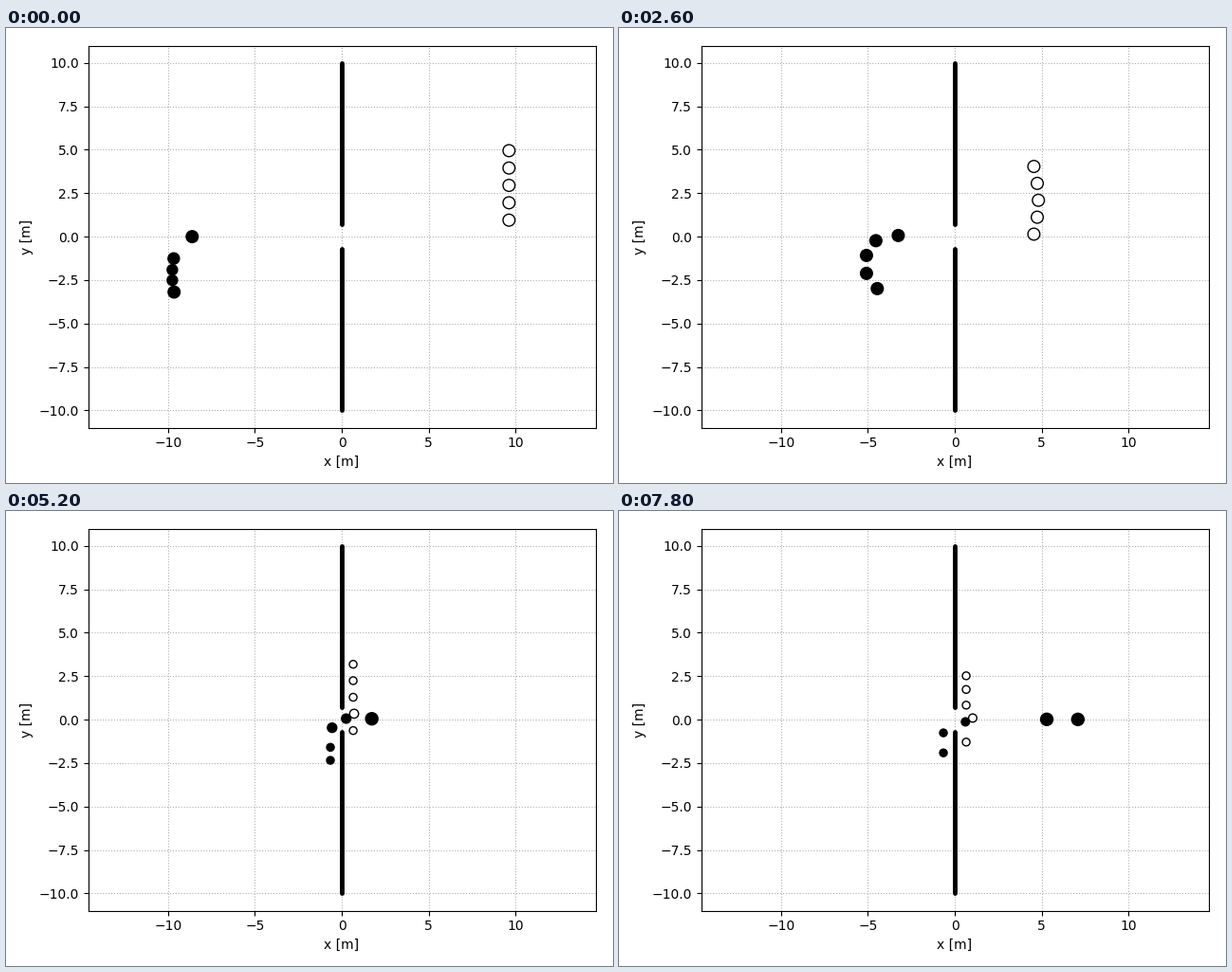
A matplotlib script that plays this animation: 640 by 480 pixels, repeating every 8000 ms.

```python
import matplotlib.pyplot as plt
import numpy as np
from matplotlib.animation import FuncAnimation
from matplotlib.patches import Circle

W, H, DPI = 640, 480, 100
FRAMES, STEP_MS = 40, 200
LEFT, RIGHT, TOP, BOTTOM = 86.55, 621.55, 18.525, 421.675
SCALE = (BOTTOM - TOP) / 22        # pixels per metre

# metres; speeds below are metres per frame
GAP = 0.655                        # closest approach to the wall
BODY, SQUEEZED = 0.345, 0.22       # radius when free, pressed to the wall

fig = plt.figure(figsize=(W / DPI, H / DPI), dpi=DPI, facecolor="white")
ax = fig.add_axes([LEFT / W, 1 - BOTTOM / H,
                   (RIGHT - LEFT) / W, (BOTTOM - TOP) / H])
half = (RIGHT - LEFT) / SCALE / 2
ax.set_xlim(-half, half)
ax.set_ylim(-11, 11)
ax.set_xticks(range(-10, 11, 5))
ax.set_xlabel("x [m]")
ax.set_ylabel("y [m]")
ax.grid(linestyle=":")
ax.set_axisbelow(True)

for side in (1, -1):
    ax.plot([0, 0], [0.7 * side, 10 * side], color="black", lw=3.5,
            solid_capstyle="round", zorder=2)


class Walker:
    """Walks straight to the wall, then slides along it or uses the door.

    kick is a starting offset that dies away as the crowd spreads out.
    """

    def __init__(self, heading, far, y, speed, drift,
                 kick=(0, 0), slide=0.0, door=None):
        self.heading, self.far, self.y = heading, far, y
        self.speed, self.drift, self.kick = speed, drift, np.array(kick)
        self.slide, self.door = slide, door
        self.hit = (far - GAP) / speed
        self.disc = Circle((0, 0), BODY, edgecolor="black", lw=1, zorder=3,
                           facecolor="black" if heading > 0 else "white")
        ax.add_patch(self.disc)

    def at(self, t):
        """Position and free radius at frame t."""
        walked = min(t, self.hit)
        ahead = -self.far + self.speed * walked
        y = self.y + self.drift * walked
        r = BODY
        wait = t - walked
        if wait > 0 and self.door is None:
            y += self.slide * wait
            r = SQUEEZED
        elif wait > 0:
            ahead += self.door * wait
            y *= np.exp(-wait / 10)
            r = 0.26 + 0.12 * self.door
            if ahead > GAP:
                ahead = GAP + (ahead - GAP) / self.door * self.speed
                r = 0.355
        pos = np.array([self.heading * ahead, y])
        return pos + self.kick * np.exp(-t / 3), r


walkers = [
    Walker(1, 8.61, 0.0, 0.412, 0.005, door=0.32),
    Walker(1, 9.78, -0.64, 0.403, 0.032, (0.11, -0.62), door=0.27),
    Walker(1, 9.92, -1.69, 0.372, 0.047, (0.17, -0.22), door=0.09),
    Walker(1, 9.92, -2.61, 0.372, 0.038, (0.17, 0.10), slide=0.064),
    Walker(1, 9.70, -3.74, 0.403, 0.057, (0.05, 0.55), slide=0.033),
]
# the opposing column; the one facing the door is slowly pushed back
for k in range(2, -3, -1):
    walkers.append(Walker(-1, 9.62, 2.95 + k, 0.37 + 0.005 * k * k,
                          -0.066 - 0.002 * k, slide=-0.035 - 0.004 * k * k,
                          door=-0.025 if k == -1 else None))


def draw(i):
    spots, radii = zip(*(w.at(i) for w in walkers))
    for n, w in enumerate(walkers):
        # neighbours never overlap: shrink to half the nearest distance
        near = min(np.hypot(*(spots[n] - p))
                   for m, p in enumerate(spots) if m != n)
        w.disc.center = spots[n]
        w.disc.radius = min(radii[n], near / 2)
    return [w.disc for w in walkers]


anim = FuncAnimation(fig, draw, frames=FRAMES, interval=STEP_MS,
                     repeat=True, repeat_delay=0, blit=False)
plt.show()
```
